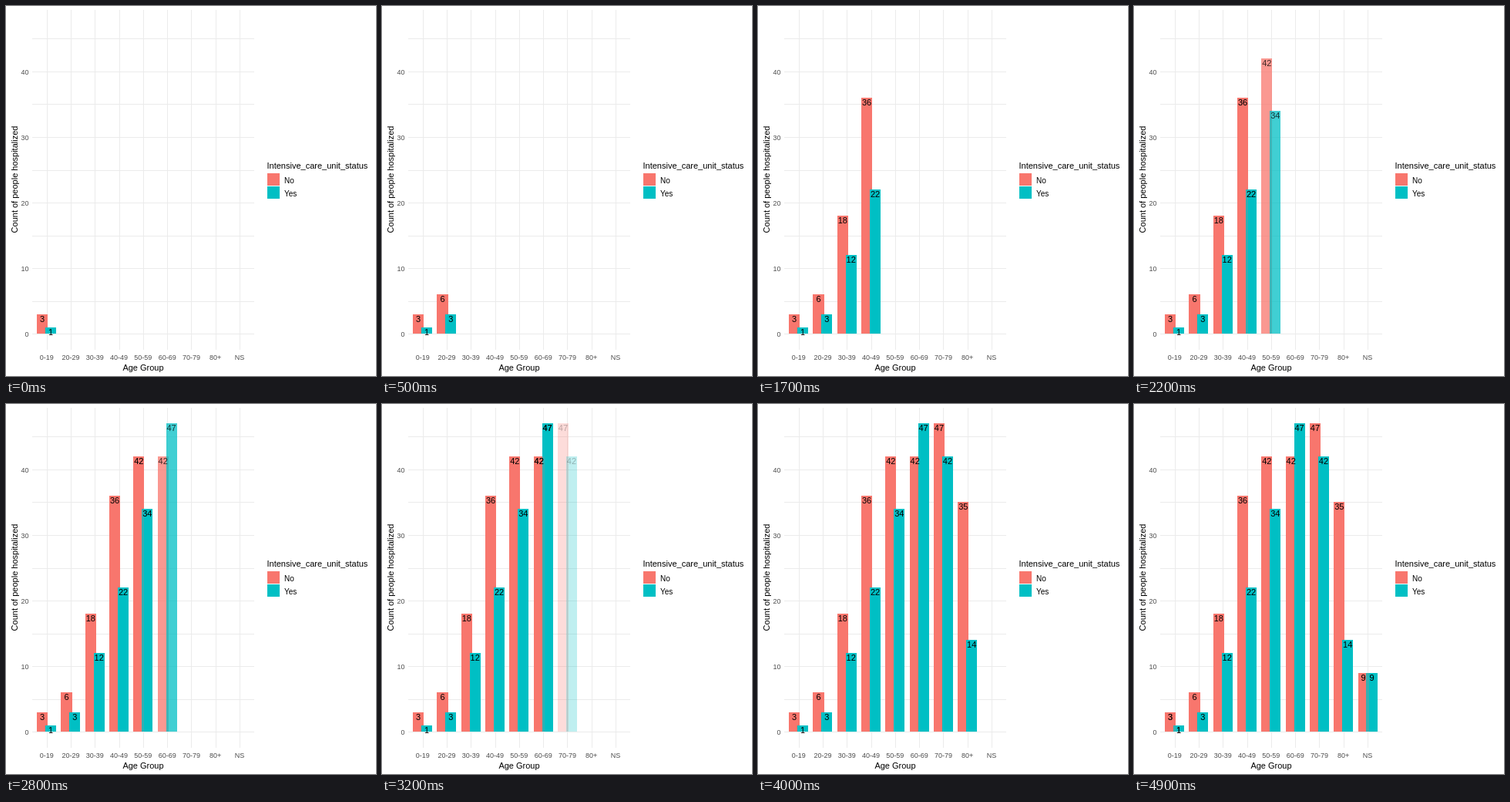
Animation, 480 px wide and 480 px high, one loop 10 s. Source, as an HTML page:

```html
<!DOCTYPE html>
<html lang="en">
<head>
<meta charset="utf-8">
<title>People hospitalized by age group</title>
<style>
  html, body { margin: 0; width: 100%; height: 100%; overflow: hidden; background: #fff; }
  svg { display: block; width: 480px; height: 480px; }
  text { font: 11px "Liberation Sans", Arial, sans-serif; fill: #000; }
  rect { shape-rendering: crispEdges; }
  .tick { font-size: 9px; fill: #4d4d4d; }
  .key { font-size: 10px; }
  .mid { text-anchor: middle; }
  .end { text-anchor: end; }
</style>
</head>
<body>
<svg id="chart" viewBox="0 0 480 480"></svg>
<script>
const LOOP = 10000, TICKS = 100;
const RED = '#F8766D', TEAL = '#00BFC4', GRID = '#EBEBEB';
const data = [
  ['0-19', 3, 1], ['20-29', 6, 3], ['30-39', 18, 12],
  ['40-49', 36, 22], ['50-59', 42, 34], ['60-69', 42, 47],
  ['70-79', 47, 42], ['80+', 35, 14], ['NS', 9, 9]
];
// Each group hands over to the next one: [first tick, number of steps]
const handover = [
  [2, 4], [8, 4], [14, 4], [20, 4], [26, 4], [32, 4], [38, 3], [43, 3], [48, 3]
];
const STOP = 50; // the picture holds from this tick to the end of the loop

const STEP = 31.3, UNIT = 8.51, BASE = 425;
const xOf = i => 52.65 + i * STEP;
const yOf = v => Math.round(425.3 - v * UNIT);

const svg = document.getElementById('chart');

function add(parent, tag, attrs = {}, content = '') {
  const el = document.createElementNS('http://www.w3.org/2000/svg', tag);
  for (const k in attrs) el.setAttribute(k, attrs[k]);
  el.textContent = content;
  return parent.appendChild(el);
}
const box = (parent, x, y, width, height, fill) =>
  add(parent, 'rect', { x, y, width, height, fill });
const label = (parent, x, y, content, cls = '') =>
  add(parent, 'text', { x, y, class: cls }, content);

// Grid and axes
for (let v = 0; v <= 45; v += 5) {
  box(svg, 34, yOf(v), 288, 1, GRID);
  if (v % 10 === 0) label(svg, 29.5, yOf(v) + 4, v, 'tick end');
}
data.forEach(([name], i) => {
  box(svg, Math.round(xOf(i)), 5, 1, 441, GRID);
  label(svg, xOf(i), 459, name, 'tick mid');
});
label(svg, 178, 473, 'Age Group', 'mid');
add(svg, 'text', { transform: 'translate(15 225) rotate(-90)', class: 'mid' },
  'Count of people hospitalized');

// Legend
label(svg, 338.5, 211, 'Intensive_care_unit_status');
box(svg, 339, 217, 16, 16, RED);
box(svg, 339, 234, 16, 16, TEAL);
label(svg, 361, 230, 'No', 'key');
label(svg, 361, 247, 'Yes', 'key');

// Steps are [tick, opacity] pairs; every value holds until the next
function play(el, steps) {
  const frames = steps.map(([tick, opacity]) =>
    ({ offset: tick / TICKS, opacity, easing: 'step-end' }));
  frames.push({ offset: 1, opacity: steps[steps.length - 1][1] });
  el.animate(frames, { duration: LOOP, iterations: Infinity });
}

function fade([start, count], entering) {
  const steps = [];
  for (let k = 1; k <= count && start + k - 1 < STOP; k++) {
    steps.push([start + k - 1, entering ? k / count : 1 - k / count]);
  }
  return steps;
}

const lastingSteps = i => [[0, 0], [handover[i][0], 1]];

function liveSteps(i) {
  const leave = fade(handover[i], false);
  return i === 0
    ? [[0, 1], ...leave, ...fade(handover[8], true)]
    : [[0, 0], ...fade(handover[i - 1], true), ...leave];
}

// Lasting marks lie under the live ones, all numbers above all bars
const [lastingBars, liveBars, lastingNums, liveNums] =
  Array.from({ length: 4 }, () => add(svg, 'g'));

function drawGroup(i, bars, nums, steps) {
  [RED, TEAL].forEach((fill, side) => {
    const value = data[i][side + 1];
    const mid = xOf(i) + (side ? 5.48 : -5.48);
    const left = Math.round(mid - 7.04), right = Math.round(mid + 7.04);
    const top = yOf(value);
    play(box(bars, left, top, right - left, BASE - top, fill), steps);
    play(label(nums, mid, top + 10, value, 'mid'), steps);
  });
}

data.forEach((_, i) => {
  drawGroup(i, lastingBars, lastingNums, lastingSteps(i));
  drawGroup(i, liveBars, liveNums, liveSteps(i));
});
</script>
</body>
</html>
```
